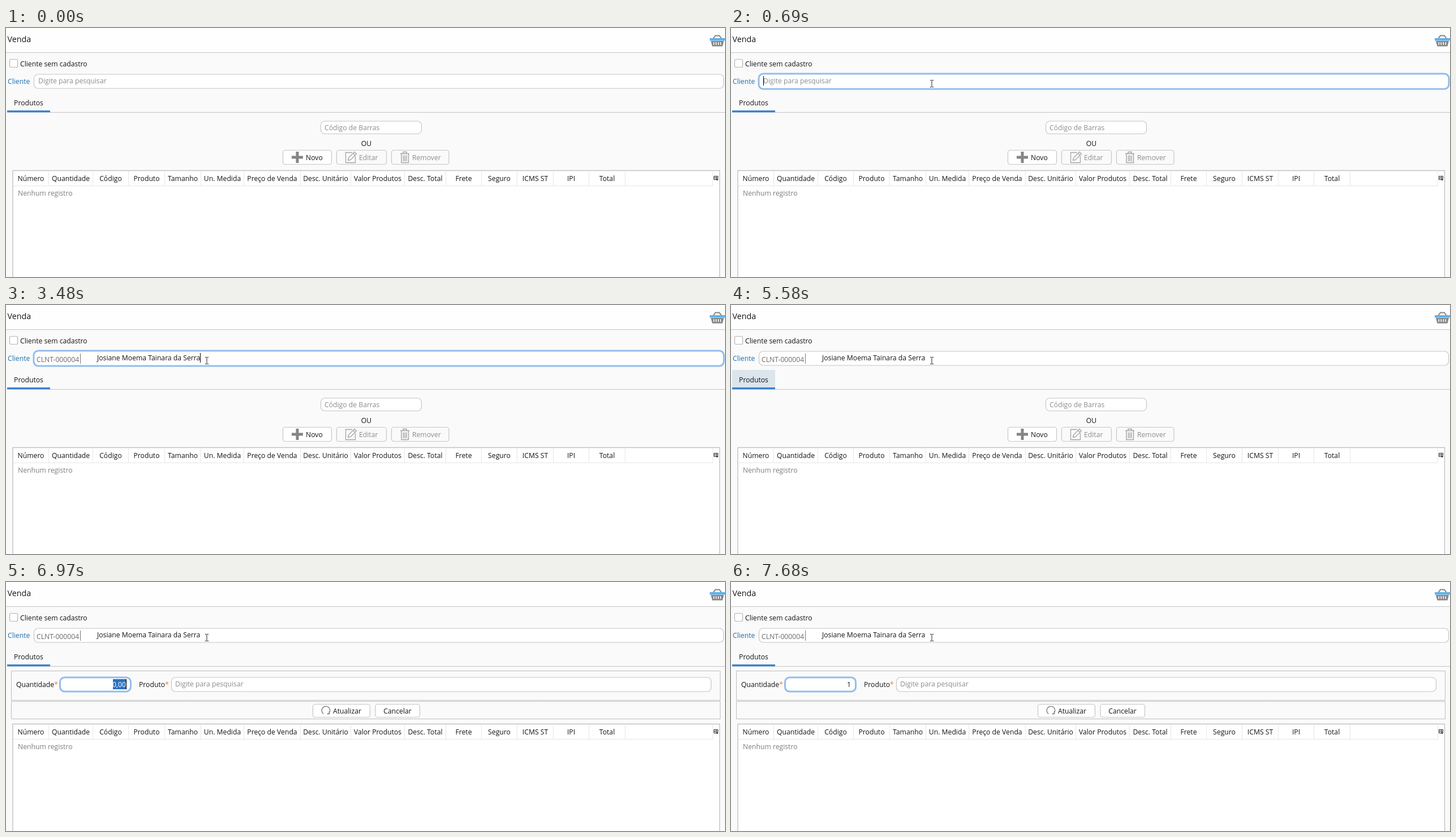
Animation of 1271 by 441 pixels, one loop 8000 ms. Source, as an HTML page with a canvas:

```html
<!DOCTYPE html>
<html lang="pt-BR">
<head>
<meta charset="utf-8">
<title>Venda</title>
<style>
  html, body { margin: 0; width: 100%; height: 100%; overflow: hidden; background: #fafafa; }
  canvas { display: block; width: 1271px; height: 441px; }
</style>
</head>
<body>
<canvas id="stage" width="1271" height="441"></canvas>
<script>
const ctx = document.getElementById('stage').getContext('2d');
const FONT = '"Open Sans", "Noto Sans", sans-serif';
const LOOP = 8000;
const AT = { focus: 690, type: 1380, pick: 3480, tab: 5580, button: 6270, form: 6970, amount: 7680 };
const TYPED = [1380, 2100, 2790];
const CLIENT = 'Josiane Moema Tainara da Serra';
const INK = '#141414', HINT = '#8c8c8c', OFF = '#a3a3a3', EDGE = '#c6c6c6', RING = '#92bdee';

const HEADS = ['Número', 'Quantidade', 'Código', 'Produto', 'Tamanho', 'Un. Medida', 'Preço de Venda',
  'Desc. Unitário', 'Valor Produtos', 'Desc. Total', 'Frete', 'Seguro', 'ICMS ST', 'IPI', 'Total'];
const COLS = [12, 75, 153, 216, 280, 344, 420, 520, 609, 704, 777, 840, 903, 967, 1030, 1094];

function text(str, x, y, color = INK, { align = 'left', size = 12.2, weight = 400 } = {}) {
  ctx.font = `${weight} ${size}px ${FONT}`;
  ctx.textAlign = align;
  ctx.fillStyle = color;
  ctx.fillText(str, x, y);
  return ctx.measureText(str).width;
}

function fill(color, x, y, w, h) {
  ctx.fillStyle = color;
  ctx.fillRect(x, y, w, h);
}

function box(x, y, w, h, r, { bg = '#fff', edge = EDGE, line = 1.2 } = {}) {
  ctx.beginPath();
  ctx.roundRect(x, y, w, h, r);
  ctx.fillStyle = bg;
  ctx.fill();
  ctx.strokeStyle = edge;
  ctx.lineWidth = line;
  ctx.stroke();
}

function stroke(color, width, ...paths) {
  ctx.strokeStyle = color;
  ctx.lineWidth = width;
  ctx.beginPath();
  for (const [start, ...rest] of paths) {
    ctx.moveTo(...start);
    rest.forEach(p => ctx.lineTo(...p));
  }
  ctx.stroke();
}

function field(x, y, w, h, focused) {
  if (focused) box(x - 0.5, y - 1, w + 1, h + 2, 8, { edge: RING, line: 3 });
  else box(x, y, w, h, 7);
}

const caret = (x, y = 85, h = 17) => fill('#000', Math.round(x), y, 1, h);

function basket() {
  ctx.lineCap = 'round';
  stroke('#858585', 2, [[1250, 19], [1254, 13.5], [1261, 13.5], [1265, 19]]);
  ctx.lineCap = 'butt';
  ctx.fillStyle = '#858585';
  ctx.beginPath();
  ctx.moveTo(1246, 23);
  ctx.lineTo(1269, 23);
  ctx.lineTo(1266.5, 32.5);
  ctx.lineTo(1248.5, 32.5);
  ctx.fill();
  for (let i = 0; i < 4; i++) fill('#fff', 1250.5 + i * 4, 25, 1.6, 5);
  fill('#5fb2ec', 1244, 18, 27, 4.5);
}

function ibeam() {
  stroke('#222', 1,
    [[352, 92.5], [354.5, 92.5]], [[355.5, 92.5], [358, 92.5]],
    [[355, 93], [355, 104]],
    [[352, 104.5], [354.5, 104.5]], [[355.5, 104.5], [358, 104.5]]);
}

function header(t) {
  fill('#fafafa', 0, 0, 1271, 441);
  fill('#fefefe', 0, 0, 1271, 43);
  fill('#c4c4c4', 0, 43, 1271, 1);
  text('Venda', 2.5, 25, INK, { size: 14.3 });
  basket();
  box(6.5, 55.5, 14, 14, 2, { edge: '#b5b5b5' });
  text('Cliente sem cadastro', 25, 67.5);
  text('Cliente', 3, 99, '#1c6eb0');
  client(t);

  if (t >= AT.tab && t < AT.button) fill('#dbe5ed', 2, 115, 76, 32);
  text('Produtos', 40, 137, INK, { align: 'center' });
  fill('#c4c4c4', 78, 149, 1193, 1);
  fill('#3c80cb', 2, 146, 76, 3.5);
}

function client(t) {
  const focused = t >= AT.focus && t < AT.tab;
  field(49.5, 82, 1219, 25, focused);
  if (t < AT.type) {
    text('Digite para pesquisar', 57, 98, HINT);
    if (focused) caret(57);
  } else if (t < AT.pick) {
    const count = TYPED.filter(at => t >= at).length;
    caret(57 + text(CLIENT.slice(0, count), 57, 98));
  } else {
    text('CLNT-000004', 54, 100.5, '#6a6a6a', { weight: 500 });
    fill('#777', 131, 86, 1, 18);
    const w = text(CLIENT, 161, 98);
    if (focused) caret(161 + w);
  }
  if (t >= AT.focus) ibeam();
}

function plus(color) {
  fill(color, 505, 226.5, 20, 5);
  fill(color, 512.5, 219, 5, 20);
}

function pencil() {
  stroke(OFF, 1.3, [[612, 220.5], [600.5, 220.5], [600.5, 238.5], [617.5, 238.5], [617.5, 227]],
    [[604.5, 234.5], [605.5, 230], [616, 219.5], [619.5, 223], [609, 233.5], [604.5, 234.5]],
    [[613.5, 222], [617, 225.5]]);
}

function trash() {
  stroke(OFF, 1.4, [[697, 222.5], [713, 222.5]], [[702, 222], [702, 219.5], [708, 219.5], [708, 222]],
    [[699, 223], [699, 238.5], [711.5, 238.5], [711.5, 223]],
    [[702.5, 225.5], [702.5, 236]], [[705.2, 225.5], [705.2, 236]], [[708, 225.5], [708, 236]]);
}

function toolbar(active) {
  field(556.5, 165, 178, 22.5);
  text('Código de Barras', 563, 181, HINT);
  text('OU', 637, 209, INK, { align: 'center' });
  if (active) {
    box(489, 215.5, 87, 27, 4, { bg: '#4b89ca', edge: RING, line: 3 });
    plus('#fff');
    text('Novo', 529, 234, '#fff', { weight: 700 });
  } else {
    box(489.5, 216.5, 86, 25, 4);
    plus('#858585');
    text('Novo', 530, 234);
  }
  box(584.5, 216.5, 88, 25, 4, { bg: '#fafafa' });
  pencil();
  text('Editar', 624, 234, HINT);
  box(681.5, 216.5, 101.5, 25, 4, { bg: '#fafafa' });
  trash();
  text('Remover', 718, 234, HINT);
}

function label(str, x) {
  const w = text(str, x, 186);
  text('*', x + w, 186, '#e08a2e');
}

function reload() {
  ctx.strokeStyle = '#777';
  ctx.lineWidth = 1.3;
  ctx.beginPath();
  ctx.arc(565.5, 227.5, 7.3, 2.2, 7.1);
  ctx.stroke();
  stroke('#777', 1.3, [[571.5, 229], [571.5, 233.5], [567.5, 233.5]]);
}

function form(t) {
  const frame = { bg: '#fafafa', edge: '#bdbdbd', line: 1 };
  box(9.5, 157.5, 1253, 52, 0, frame);
  box(9.5, 211.5, 1253, 31, 0, frame);
  label('Quantidade', 18);
  field(96, 170, 124, 23, true);
  if (t < AT.amount) {
    fill('#2a72c0', 189, 172, 23, 18);
    text('0,00', 212, 186, '#fff', { align: 'right' });
    caret(212, 172, 18);
  } else {
    text('1', 212, 186, INK, { align: 'right' });
  }
  label('Produto', 235);
  field(292.5, 169, 954, 25);
  text('Digite para pesquisar', 299, 185, HINT);
  box(542.5, 216.5, 101, 23, 4);
  reload();
  text('Atualizar', 578, 232.5);
  box(653, 216.5, 78.5, 23, 4);
  text('Cancelar', 692, 232.5, INK, { align: 'center' });
}

function table(y) {
  box(12, y + 0.5, 1249.5, 240, 0, { edge: '#c2c2c2', line: 1.4 });
  fill('#e6e6e6', 13, y + 27, 1237, 1);
  for (const x of [...COLS.slice(1), 1249]) fill('#e6e6e6', x, y + 2, 1, 25);
  HEADS.forEach((name, i) =>
    text(name, (COLS[i] + COLS[i + 1]) / 2 + 0.5, y + 19, INK, { align: 'center' }));
  stroke('#222', 1, [[1251, y + 10.5], [1258.5, y + 10.5], [1258.5, y + 14]],
    [[1251.5, y + 10], [1251.5, y + 16.5], [1255, y + 16.5]],
    [[1251, y + 13.5], [1258, y + 13.5]], [[1255.5, y + 10], [1255.5, y + 14]]);
  ctx.fillStyle = '#222';
  ctx.beginPath();
  ctx.moveTo(1254.5, y + 15);
  ctx.lineTo(1259.5, y + 15);
  ctx.lineTo(1257, y + 18.5);
  ctx.fill();
  text('Nenhum registro', 21, y + 45, '#7d7d7d');
}

function draw(t) {
  header(t);
  const open = t >= AT.form;
  if (open) form(t);
  else toolbar(t >= AT.button);
  table(open ? 251 : 252);
}

const start = performance.now();
function tick() {
  draw((performance.now() - start) % LOOP);
  requestAnimationFrame(tick);
}
tick();
</script>
</body>
</html>
```
